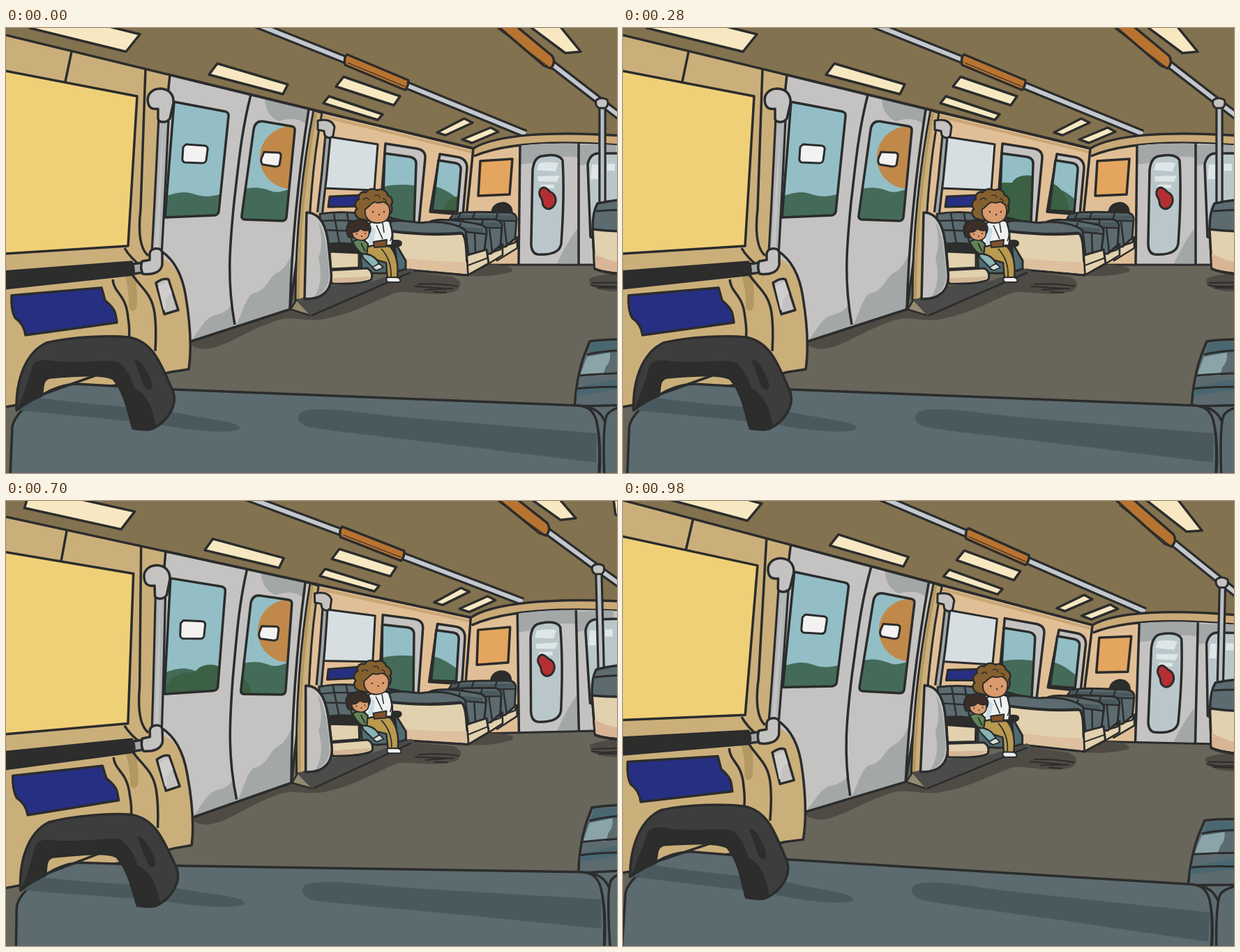
Recreate the animation shown at these times as an HTML page with a canvas. Size 876x639 px, loop 1.12 s.

```html
<!DOCTYPE html>
<html lang="en">
<head>
<meta charset="utf-8">
<title>Train ride</title>
<style>
html, body { margin: 0; width: 100%; height: 100%; overflow: hidden; background: #83724f; }
canvas { display: block; }
</style>
</head>
<body>
<canvas id="stage" width="876" height="639"></canvas>
<script>
const ctx = document.getElementById('stage').getContext('2d');
const INK = '#2b2c2c', TAN = '#cbaf7a', PEACH = '#e1bf96', GREY = '#c5c3c2', SHADE = '#a3a7a8',
  SLATE = '#5c6b70', DEEP = '#4a595e', BEIGE = '#e1d1ae', BLUE = '#262f82', LIGHT = '#f7e8c2',
  SKY = '#93bec6', HILL = '#446b59', BUSH = '#3b6043', BLACK = '#2d2d2c', FLOOR = '#68655a',
  SHADOW = '#4f4b44', ORANGE = '#b87331', SKIN = '#d99b6d';
const STEP = 140;

// Path with an optional fill and an optional outline (width 0 = none).
function draw(d, fill, width = 3.5) {
  const path = new Path2D(d);
  if (fill) { ctx.fillStyle = fill; ctx.fill(path); }
  if (width) { ctx.lineWidth = width; ctx.strokeStyle = INK; ctx.stroke(path); }
}
const line = (d, width) => draw(d, null, width);
const flat = (d, fill) => draw(d, fill, 0);

function tube(d, color, width) {
  const path = new Path2D(d);
  for (const [c, w] of [[INK, width + 6.4], [color, width]]) {
    ctx.strokeStyle = c;
    ctx.lineWidth = w;
    ctx.stroke(path);
  }
}
function inside(d, paint) {
  ctx.save();
  ctx.clip(new Path2D(d));
  paint();
  ctx.restore();
}
function disc(x, y, r, fill, width = 0) {
  draw(`M${x - r},${y}a${r},${r} 0 1 0 ${2 * r},0a${r},${r} 0 1 0 ${-2 * r},0Z`, fill, width);
}

const panes = [
  'M241,106L315,120Q320,122 319,127L305,264Q304,268 299,269L228,272Z',
  'M368,134L409,141Q415,142 414,148L402,272Q401,277 396,277L342,275Q337,274 338,269L355,146Q357,133 368,134Z',
  'M543,180L579,185Q589,187 588,196L585,281L540,270Z',
  'M620,190L645,194Q653,196 652,204L647,264L611,262Z'
];
const hills = 'M220,244C240,238 252,233 268,238S290,243 310,238L335,233C355,226 370,230 380,234S395,234 420,228' +
  'L535,230C550,224 570,224 595,227C620,223 640,236 665,262V290H220Z';
// Centre and top of the passing bush at each step.
const bushAt = [[691, 225], [628, 208], [580, 208], [475, 217], [374, 226], [295, 228], [208, 230], [120, 232]];

function scenery(step) {
  const [x, y] = bushAt[step];
  for (const pane of panes) {
    inside(pane, () => {
      ctx.fillStyle = SKY;
      ctx.fillRect(200, 90, 480, 210);
      disc(409, 186, 45, '#c0894a');
      flat(hills, HILL);
      ctx.translate(x, y);
      flat('M-70,100C-72,40 -62,20 -45,17C-36,12 -26,15 -22,14C-15,0 14,0 20,14C42,8 58,32 62,60V100Z', BUSH);
    });
    line(pane);
  }
}

function ceiling() {
  ctx.fillStyle = '#83724f';
  ctx.fillRect(-40, -40, 960, 720);
  ctx.fillStyle = FLOOR;
  ctx.fillRect(-40, 338, 960, 340);
  [
    'M34,0L44,-28L192,9L172,34Z', 'M303,51L404,81L397,95L291,67Z', 'M484,70L565,98L556,111L473,84Z',
    'M463,98L540,124L533,132L455,108Z', 'M657,130L669,136L630,154L618,150Z',
    'M695,143L706,149L668,165L654,160Z', 'M735,-14L780,-20L824,34L802,36Z', 'M878,0L881,30L900,40V0Z'
  ].forEach(d => draw(d, LIGHT));
  tube('M345,-11L490,47M574,82L745,152', '#c2c8ce', 6);
  draw('M489,38L577,75Q577,84 572,89L486,53Q484,42 489,38Z', ORANGE);
  line('M490,50L572,84', 1.2);
}

function backWall() {
  draw('M446,119L670,173L664,310H432Z', PEACH);
  flat('M449,123L668,176V180L449,128Z', '#caa777');
  draw('M544,166L588,173Q602,175 601,187L592,282L536,274Z', GREY);
  draw('M622,181L646,185Q661,187 661,201L655,268L608,264Z', GREY);
  draw('M462,156L533,167L528,233L456,230Z', '#d6dee1', 3);
  draw('M464,242L508,240L506,256L462,257Z', BLUE, 3);

  flat('M670,173C700,154 780,146 900,156V339H658Z', PEACH);
  flat('M670,173C700,154 780,146 900,156V170C790,160 720,165 671,185Z', '#c9a977');
  line('M671,184C715,165 790,160 900,170M670,173L658,290');
  line('M670,173C700,154 780,146 900,156');
  flat('M737,169Q800,162 900,170V340H735Z', GREY);
  flat('M738,169Q770,165 819,166V186Q800,182 780,190L738,196ZM790,338Q803,310 819,288V338ZM822,168H875V184L822,198Z', SHADE);
  draw('M680,191L726,188L722,239L677,241Z', '#e4a55f');
  line('M737,168L735,339M821,166V339');
  line('M690,340H900', 3);
  draw('M768,184Q792,179 798,190Q801,240 796,310Q793,327 762,325Q752,323 753,306L755,204Q757,186 768,184Z', '#bac7ca');
  draw('M838,300L834,196Q837,180 850,180H885V320Z', '#bac7ca');
  flat('M764,194Q780,191 792,194L788,206L761,204ZM762,213L794,212L790,221L763,220ZM767,225H786V230H766ZM840,196H849V217H838ZM862,195H873V205H862Z', '#dfe6e7');
  draw('M766,232C771,225 777,232 780,235C789,239 791,249 784,257C777,263 769,258 769,249C768,243 762,240 766,232Z', '#b52f32', 3);
}

// One row of far seats: back, side and base, stepping towards the viewer.
function seatRow(x, y, right, foot) {
  draw(`M${right - 2},${foot - 16}L${right + 1},${foot - 24}V${foot - 8}L${right - 28},${foot + 10}L${right - 32},${foot - 6}Z`, BEIGE, 2.6);
  draw(`M${x},${y + 13}C${x + 4},${y} ${x + 18},${y} ${right - 10},${y + 2}Q${right},${y + 3} ${right},${y + 12}` +
    `L${right - 2},${foot - 22}L${right - 16},${foot - 10}L${right - 45},${foot - 8}V${y + 26}Z`, SLATE, 3);
  flat(`M${x + 5},${y + 5}L${right - 3},${y + 6}V${y + 12}L${x + 2},${y + 12}Z`, DEEP);
  line(`M${x},${y + 13}L${right},${y + 14}M${right - 18},${y + 14}L${right - 14},${foot - 13}M${right - 34},${y + 14}L${right - 31},${foot - 10}` +
    `M${x + 16},${y + 2}L${x + 11},${y + 13}M${x + 36},${y + 2}L${x + 32},${y + 13}M${right - 27},${y + 2}L${right - 30},${y + 13}`, 2.4);
}

function farSeats() {
  flat('M655,340C690,338 735,340 725,350C690,360 665,355 655,356Z', SHADOW);
  draw('M697,266C697,248 725,246 725,265L716,266Q711,259 705,266Z', BLACK);
  seatRow(636, 263, 732, 324);
  seatRow(620, 273, 711, 334);
  draw('M660,325L689,318L692,338L662,355Z', BEIGE, 3);
  line('M662,341L691,330', 2);
  draw('M603,283C607,272 640,274 678,282Q690,284 689,294L686,319L662,326L650,300H603Z', SLATE, 3);
  flat('M606,281L684,288V295L604,287Z', DEEP);
  line('M603,287L689,296M672,295L673,322M626,278L622,288M652,280L648,292', 2.4);

  draw('M546,292L552,278C570,273 590,282 602,279C630,277 650,283 659,291L663,326L650,302L550,298Z', SLATE, 3);
  draw('M552,292Q610,299 654,295Q659,300 660,320L662,355L572,347L552,322Z', BEIGE);
  flat('M562,329Q610,336 660,336L661,353L573,345Z', '#dec09e');
  line('M550,291Q605,298 653,294', 3);
}

function nearBench() {
  flat('M416,391L468,370L524,364L580,345L590,353L437,414Z', '#4b4b49');
  draw('M450,267Q480,262 514,267L512,313H452Z', SLATE, 3);
  line('M454,277Q484,275 510,278M470,266L478,310M489,266L496,308M455,290L510,292', 2.4);
  draw('M508,320L560,312L573,334L573,346Q545,356 510,350Z', '#506b72', 3);
  draw('M459,310Q485,306 511,312V321Q480,322 459,320Z', BLACK, 2);
  draw('M464,321L506,323V344L466,346Z', BEIGE, 3);
  draw('M464,348L518,345Q527,350 524,361Q512,368 468,367Z', BEIGE, 3);
  flat('M467,359L522,357Q518,366 468,365Z', '#d5b696');
  draw('M550,306Q567,303 567,309Q567,314 558,314L560,330L553,331L551,314Z', BLACK, 2);
  draw('M431,265C448,265 460,279 463,318L466,350C469,378 452,390 428,389Z', GREY);
  flat('M448,279Q460,295 463,352Q464,378 442,386Q456,365 448,330Q456,310 448,279Z', SHADE);
  line('M438,413L580,351', 2.5);
}

function woman() {
  draw('M523,279Q513,286 515,314L553,312Q557,298 550,278Q541,273 523,279Z', '#eef1f0', 2.5);
  flat('M524,283L519,310H526L530,290Z', '#cbdce6');
  line('M531,283L540,303M551,283Q556,295 551,306M540,280L542,294', 1.6);
  draw('M515,315Q534,309 551,314Q564,330 561,358L547,360L545,337L520,330Q510,322 515,315Z', '#b99a4f', 2.5);
  line('M538,317Q553,333 552,357', 1.8);
  draw('M547,358H561Q568,361 564,365H548Q543,362 547,358Z', '#eef1f0', 2);
  draw('M527,307L546,304L545,314L528,315Z', '#80532b', 2);
  draw('M512,275C500,274 498,263 503,260C498,253 502,247 506,246C504,238 511,234 516,236C521,229 529,231 532,233C541,229 547,236 547,240C555,243 555,251 552,254C556,262 550,269 545,273Q526,281 512,275Z', '#85602f', 2.6);
  draw('M515,260C520,258 523,251 529,250C534,253 538,249 542,250C548,252 551,258 550,265C549,276 541,280 532,280C521,280 513,272 515,260Z', SKIN, 2);
  line('M512,247q5,-6 9,0M528,241q7,-4 8,3M540,245q5,0 5,5', 1.3);
  [[526, 264], [542, 264], [535, 268]].forEach(([x, y]) => disc(x, y, 1.2, INK));
}

function child() {
  draw('M497,307Q510,299 519,310L517,327Q505,324 497,307Z', '#628557', 2.3);
  draw('M510,324Q526,324 533,335L537,342L529,347L512,330Z', '#89b4b4', 2.3);
  draw('M525,344L535,338L541,344L531,348Z', '#d6dfd8', 1.8);
  draw('M491,300C486,289 488,279 499,277C513,272 525,281 522,292Q519,301 508,302Z', '#3b2d27', 2.5);
  draw('M496,293Q504,294 508,288Q514,293 520,290Q523,304 509,305Q497,304 496,293Z', SKIN, 1.7);
  [[503, 296], [515, 295], [510, 299]].forEach(([x, y]) => disc(x, y, 1, INK));
  line('M509,309L515,321', 1.8);
}

function doors(step) {
  flat('M262,449L408,402L439,413L583,350L640,357Q659,365 646,377C620,388 578,376 559,380C531,390 500,409 465,416C430,426 410,409 380,423C338,438 310,461 283,461Q264,459 262,449Z', SHADOW);
  const leaf = 'M234,67L446,119L407,404L262,451L214,340Z';
  flat(leaf, GREY);
  flat('M371,102L434,118L430,138Q416,126 391,134Q372,125 371,102ZM264,450C278,435 284,416 300,412Q318,408 324,396L327,430ZM329,428C340,408 343,388 354,381C374,378 376,358 388,352Q403,344 410,322L407,404Z', SHADE);
  line(leaf);
  line('M351,96C337,150 333,200 327,250C320,320 317,365 328,426M434,117C421,200 410,300 407,404');
  scenery(step);
  draw('M258,167L285,169Q290,170 289,175L287,190Q286,194 281,194L256,193Q252,191 253,186L254,171Z', '#f4f2f1', 3);
  draw('M370,178L391,179Q395,180 394,185L392,197Q390,199 386,199L368,196Q365,193 366,188Z', '#f4f2f1', 3);
  draw('M441,118L453,122C440,190 433,270 431,390L415,391C415,300 425,200 441,118Z', TAN, 3);
  flat('M442,121L446,122C430,210 421,300 421,389H417C418,300 427,205 442,121Z', '#b49862');
  draw('M408,404L416,391L430,389L437,413Z', '#948a70', 2.5);
  tube('M462,150L456,213L450,265', SHADE, 4);
  draw('M447,133Q467,129 471,142L469,155Q463,161 457,154L456,148L447,146Z', GREY, 3);
}

function leftWall() {
  flat('M-30,3L234,67L222,330Q253,340 260,400Q267,450 262,490L240,494L-30,549Z', TAN);
  line('M-30,3L670,173');
  line('M94,34L85,77M200,59L193,260Q187,313 204,327M170,316Q178,330 194,342M235,67L231,105M222,320Q251,339 258,387Q268,448 262,490L236,494Q120,525 -30,549');
  draw('M-30,56L188,98L175,313L-30,326Z', '#f0d077');
  flat('M183,340Q190,380 187,402Q181,410 176,402Q177,372 168,350Z', '#b49862');
  line('M153,361C155,382 172,381 175,416Q178,434 176,448M181,354C194,374 209,381 213,409Q216,430 214,464');
  draw('M215,366Q226,358 233,361L247,405L227,411Z', GREY);
  flat('M218,371L232,364L238,381Q227,385 229,402L226,405Z', '#d0cecc');
  tube('M226,130C223,190 220,260 216,324', '#b2b5b6', 11);
  flat('M226,128L219,318H213L221,200Z', GREY);
  draw('M204,109C200,95 210,87 222,87C236,88 241,98 240,108L235,130C230,137 220,136 218,131L218,116C212,117 206,116 204,109Z', GREY);
  draw('M181,339L195,337L197,351L183,353Z', SHADE);
  draw('M206,325C206,315 222,314 224,322L224,340C222,351 210,355 196,353Q192,345 195,335L206,333Z', GREY);
  draw('M-30,352L180,336Q185,345 182,354L-30,377Z', BLACK);
  draw('M8,384L137,373L142,391Q156,403 157,411L159,423L28,441Q26,425 13,416Q7,405 8,384Z', BLUE);
}

function rightSide() {
  flat('M836,360Q860,350 900,354V377Q850,382 837,368Z', SHADOW);
  line('M590,368Q622,366 648,371M585,371L630,374M600,376L641,374M612,379L632,380M840,366L900,365M838,369Q860,374 900,368M848,373L900,374', 2);
  tube('M783,52L854,107L900,142', '#c2c8ce', 6);
  draw('M687,-18L718,-14L783,40Q789,49 781,58L771,54Z', ORANGE);
  line('M704,0L777,55', 1.2);
  tube('M855,110V252', '#b9bfc3', 5);
  draw('M846,104Q852,98 862,103Q865,111 859,115H850Q844,111 846,104Z', GREY, 3);
  draw('M841,288Q841,264 848,252Q872,246 900,246V355Q860,353 844,346Z', SLATE);
  draw('M841,289Q870,293 900,291V354Q857,352 844,345Z', BEIGE);
  flat('M844,324Q870,338 900,340V352Q857,350 845,344Z', '#d9b596');
  line('M846,263Q870,261 900,261', 3);

  draw('M837,450Q865,446 900,448V560H815Q815,510 829,470Z', SLATE);
  flat('M840,452L900,450V464L834,470ZM819,516L900,499V516L818,528Z', '#496771');
  flat('M833,472L866,466Q867,480 860,486L856,499L823,499Z', '#8ba4a9');
  line('M833,469Q855,463 900,462M822,499Q855,496 900,495M817,518Q855,514 900,516', 3);
}

function frontSeat() {
  draw('M5,670L9,572Q14,550 52,527Q73,513 100,511L240,519L818,542Q844,543 847,565Q854,600 848,670Z', SLATE);
  flat('M27,528C90,538 170,544 230,549C280,562 340,564 335,576C320,584 255,577 213,568L19,549Z', DEEP);
  flat('M427,550C455,543 510,553 560,558L847,582L846,624L700,606C600,593 480,581 433,573C416,567 415,554 427,550Z', DEEP);
  draw('M828,543L900,541V670H848Q856,600 846,562Q840,546 828,543Z', SLATE);
  line('M828,543Q851,546 859,566');
  draw('M859,670Q854,568 862,555Q870,544 900,541V670Z', SLATE);
  line('M50,527L128,499');
  const handle = 'M15,549C14,505 28,466 58,452C96,443 150,441 176,444C211,450 222,482 240,523C246,543 231,565 211,575' +
    'C203,579 189,576 182,575C176,555 171,523 154,504C140,496 100,499 62,502C50,506 54,518 51,528Q32,536 15,549Z';
  flat(handle, '#3d3d3d');
  inside(handle, () => {
    flat('M10,560Q25,530 38,486Q41,476 60,477C100,484 145,474 162,480Q178,494 184,517Q211,530 216,580H170L145,508L55,508L53,535Z', BLACK);
    flat('M184,477Q191,473 199,488Q213,510 208,519Q200,523 195,506Z', BLACK);
  });
  line(handle);
}

function scene(step) {
  const tilt = step % 2 ? (step % 4 === 1 ? -1.4 : 1.25) : 0;
  ctx.setTransform(1, 0, 0, 1, 438, 319.5);
  ctx.rotate(tilt * Math.PI / 180);
  ctx.translate(-438, -319.5);
  ctx.lineJoin = 'round';
  ctx.lineCap = 'butt';
  ceiling();
  backWall();
  doors(step);
  farSeats();
  nearBench();
  woman();
  child();
  leftWall();
  rightSide();
  frontSeat();
}

function tick() {
  scene(Math.floor(performance.now() / STEP) % bushAt.length);
  requestAnimationFrame(tick);
}
tick();
</script>
</body>
</html>
```
